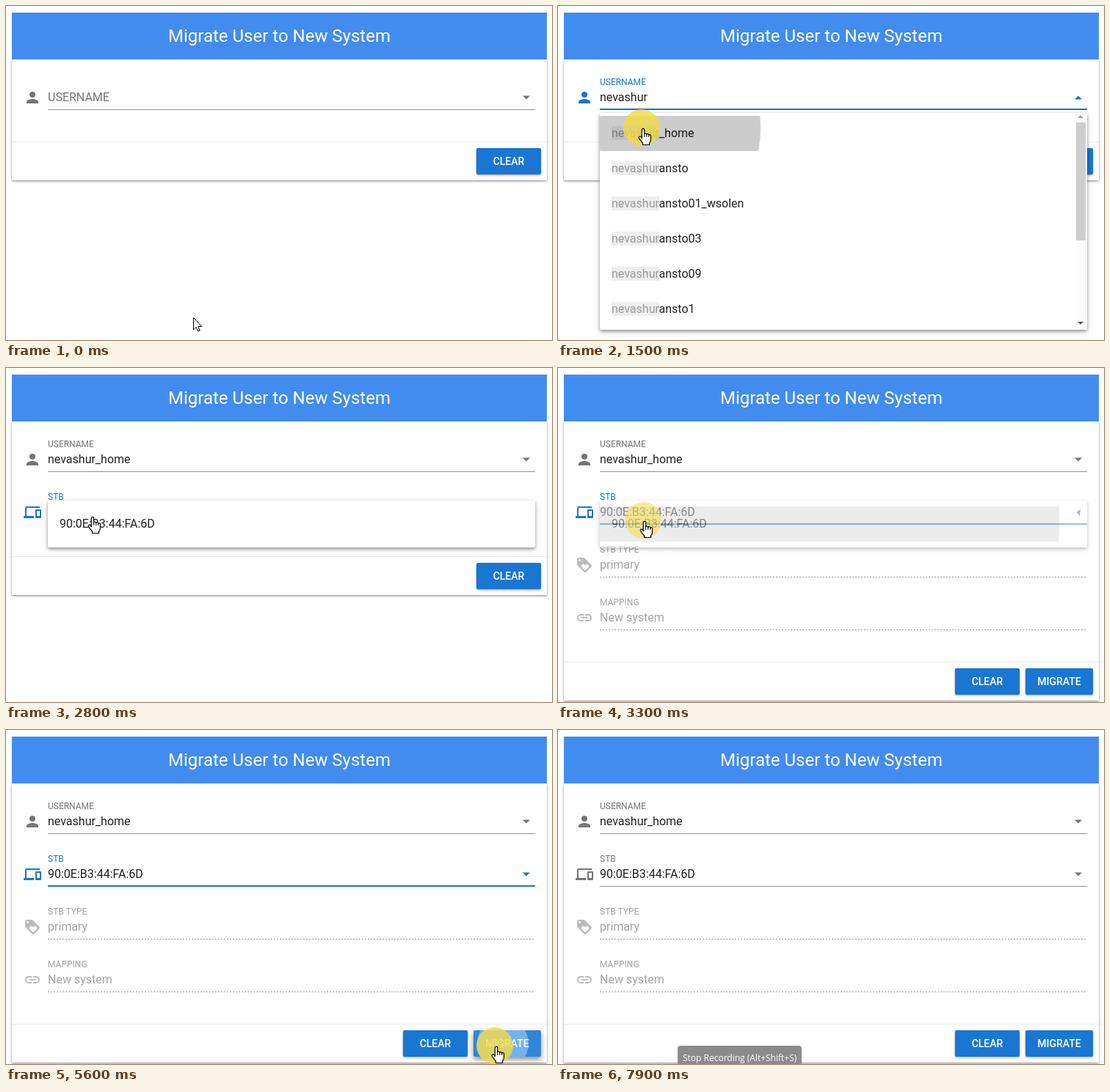
Write an HTML page that moves like this. It is 744 px wide and 456 px high and loops after 8100 ms.

```html
<!DOCTYPE html>
<html lang="en">
<head>
<meta charset="utf-8">
<title>Migrate User to New System</title>
<style>
  html, body { margin: 0; width: 100%; height: 100%; overflow: hidden; background: #fff; }
  svg { display: block; width: 744px; height: 456px; font: 16px Roboto, sans-serif; }
  .card { fill: #fff; filter: drop-shadow(0 1px 1px rgba(0,0,0,.38)) drop-shadow(0 1px 2px rgba(0,0,0,.16)); }
  .btn { filter: drop-shadow(0 1px 1px rgba(0,0,0,.28)) drop-shadow(0 1px 2px rgba(0,0,0,.14)); }
  .btn.down { filter: drop-shadow(0 4px 3px rgba(0,0,0,.3)) drop-shadow(0 2px 4px rgba(0,0,0,.18)); }
  .btn-text { font-size: 14px; font-weight: 500; fill: #fff; text-anchor: middle; }
  .menu { fill: #fff; filter: drop-shadow(0 2px 2px rgba(0,0,0,.36)) drop-shadow(0 3px 5px rgba(0,0,0,.13)); }
  .title { font-size: 24px; fill: #fff; text-anchor: middle; }
  .tip { font: 12px "Open Sans", sans-serif; fill: #fff; }
</style>
</head>
<body>
<svg id="stage" viewBox="0 0 744 456"></svg>
<script>
const LOOP = 8100, STEP = 100;
const BLUE = '#1976d2', HOVER = '#3385d9', INK = '#212121', GREY = '#757575', FAINT = '#a3a3a3';
const QUERY = 'nevashur', USER = 'nevashur_home', MAC = '90:0E:B3:44:FA:6D';
const NAMES = ['_home', 'ansto', 'ansto01_wsolen', 'ansto03', 'ansto09', 'ansto1'];

const ICONS = {
  person: 'M12 12a4 4 0 1 0 0-8 4 4 0 0 0 0 8zm0 2c-2.67 0-8 1.34-8 4v2h16v-2c0-2.66-5.33-4-8-4z',
  devices: 'M4 6h18V4H4a2 2 0 0 0-2 2v11H0v3h14v-3H4zM23 8h-6a1 1 0 0 0-1 1v10a1 1 0 0 0 1 1h6a1 1 0 0 0 1-1V9a1 1 0 0 0-1-1zm-1 9h-4v-7h4z',
  tag: 'M4 2h7l1.4.6 9 9a2 2 0 0 1 0 2.8l-7 7a2 2 0 0 1-2.8 0l-9-9L2 11V4a2 2 0 0 1 2-2z' +
    'M5.5 4a1.5 1.5 0 1 0 0 3 1.5 1.5 0 0 0 0-3zM13 19.5l4.3-4.2a2.5 2.5 0 0 0-3.6-3.6l-.7.7-.7-.7a2.5 2.5 0 0 0-3.6 3.6z',
  link: 'M3.9 12A3.1 3.1 0 0 1 7 8.9h4V7H7a5 5 0 0 0 0 10h4v-1.9H7A3.1 3.1 0 0 1 3.9 12zM8 13h8v-2H8zm9-6h-4v1.9h4a3.1 3.1 0 0 1 0 6.2h-4V17h4a5 5 0 0 0 0-10z'
};

const CURSORS = {
  arrow: '<path d="M.5.5V17l3.7-3.6 2.5 5.7 2.5-1-2.5-5.6h5.1z" fill="#fff" stroke="#000"/>',
  beam: '<path d="M-3-8h2.5l.5.5.5-.5H3M0-7.500V7.500M-3 8h2.500l.5-.5.5.5H3" fill="none" stroke="#000"/>',
  hand: '<path d="M-1.700 14V2a1.700 1.700 0 0 1 3.400 0v6a1.600 1.600 0 0 1 3.100.5 1.600 1.600 0 0 1 3 .8 1.500 1.500 0 0 1 2.700 1.200V15q0 3-2 5v2.500H-.5V20q-3-3-5.200-7a1.600 1.600 0 0 1 2.600-1.700z" fill="#fff" stroke="#000" stroke-width="1.200"/>' +
    '<path d="M1.700 8v4M4.800 8.500V12M7.800 9.500V12" stroke="#000" fill="none"/>'
};

// time, x, y of the pointer tip
const PATH = [
  [0, 255, 425], [100, 255, 430], [400, 241, 403], [500, 241, 403], [600, 119, 124],
  [1200, 119, 124], [1500, 116, 167], [2000, 116, 167], [2400, 118, 195], [2600, 118, 196],
  [3000, 118, 209], [4100, 118, 209], [5000, 660, 425], [5200, 668, 432], [6300, 668, 432], [6700, 650, 480]
];
// start and end of each click highlight
const CLICKS = [[1100, 1300], [1500, 1700], [2500, 2700], [3200, 3400], [5500, 5800]];

const ramp = (t, a, b) => Math.min(1, Math.max(0, (t - a) / (b - a)));
const within = (t, a, b) => t >= a && t < b;
const lerp = (a, b, k) => a + (b - a) * k;

const rect = (x, y, w, h, fill, more = '') =>
  `<rect x="${x}" y="${y}" width="${w}" height="${h}" fill="${fill}" ${more}/>`;
const text = (x, y, s, fill, more = '') => `<text x="${x}" y="${y}" fill="${fill}" ${more}>${s}</text>`;
const circle = (x, y, r, fill, more = '') => `<circle cx="${x}" cy="${y}" r="${r}" fill="${fill}" ${more}/>`;
const clip = (id, x, y, w, h, body) =>
  `<clipPath id="${id}">${rect(x, y, w, h, '#000', 'rx="2"')}</clipPath><g clip-path="url(#${id})">${body}</g>`;

function field(row, f) {
  const y = 72 * row, k = f.float ?? 1;
  const main = f.focus ? BLUE : f.disabled ? FAINT : GREY;
  let s = `<path transform="translate(24 ${113 + y})" d="${ICONS[f.icon]}" fill="${f.disabled ? '#b9bcbb' : main}" fill-rule="evenodd"/>`;
  s += text(57, lerp(130, 108, k) + y, f.label, main, `font-size="${lerp(16, 12, k)}"`);
  s += text(57, 130 + y, f.value || '', f.disabled ? FAINT : INK);
  if (f.disabled) {
    return s + `<path d="M57 ${141.5 + y}H721" stroke="#9c9c9c" stroke-dasharray="2 2"/>`;
  }
  s += f.focus ? rect(57, 140 + y, 664, 2, BLUE) : rect(57, 141 + y, 664, 1, f.hover ? '#222' : '#949494');
  return s + `<path transform="translate(709 ${125 + y}) rotate(${180 * f.open})" d="M-5-2.500H5L0 2.500z" fill="${main}"/>`;
}

function button(x, y, w, label, fill, down, extra = '') {
  return rect(x, y, w, 36, fill, `rx="2" class="btn ${down ? 'down' : ''}"`) + extra +
    text(x + w / 2, y + 23, label, '#fff', 'class="btn-text"');
}

function itemRipple(id, t, start, x, y, rowY) {
  if (t < start) return '';
  const r = 160 + 4.05 * (t - start), shade = t > start ? 0.13 : 0.2;
  return clip(id, 57, rowY, 664, 48, circle(x, y, r, '#000', `opacity="${shade}"`));
}

function nameMenu(t, open, typed) {
  if (!open) return '';
  let s = rect(57, 146, 664, 296, '#fff', 'rx="2" class="menu"');
  NAMES.forEach((tail, i) => {
    const y = 179 + 48 * i;
    if (typed.length) s += rect(73, y - 15, 65 * typed.length / QUERY.length, 19, '#eee');
    s += text(73, y, `<tspan fill="#9a9a9a">${typed}</tspan>${QUERY.slice(typed.length)}${tail}`, INK);
  });
  s += itemRipple('row1', t, 1500, 116, 167, 150);
  s += rect(705, 146, 15, 296, '#fbfbfb') + rect(706, 159, 13, 161, '#cdcdcd');
  s += '<path d="M708 153h8l-4-4z" fill="#a3a3a3"/><path d="M708 431h8l-4 4z" fill="#505050"/>';
  return `<g opacity="${open}">${s}</g>`;
}

function stbMenu(t, open) {
  if (!open) return '';
  return `<g opacity="${open}">${rect(57, 181, 664, 64, '#fff', 'rx="2" class="menu"')}` +
    text(73, 218, MAC, INK) + itemRipple('row2', t, 3200, 118, 209, 189) + '</g>';
}

function migrateButton(t, y) {
  const fill = t === 7800 ? '#2a80d6' : within(t, 4900, 7800) ? HOVER : BLUE;
  let wave = '';
  if (within(t, 5500, 6000)) {
    const k = (t - 5500) / 100, fade = 1 - ramp(t, 5600, 6000);
    wave = clip('wave', 637, y, 92, 36, circle(Math.min(683, 670 + 7 * k), 431 - 3 * Math.min(k, 1), 12 + 23 * k, '#9cd0ff', `opacity="${0.6 * fade}"`));
  }
  return button(637, y, 92, 'MIGRATE', fill, within(t, 5500, 5900), wave);
}

function pointer(t) {
  if (t >= 6700) return '';
  const i = Math.max(1, PATH.findIndex(p => p[0] >= t));
  const [a, b] = [PATH[i - 1], PATH[i]], k = ramp(t, a[0], b[0]);
  const x = Math.round(lerp(a[1], b[1], k)), y = Math.round(lerp(a[2], b[2], k));
  const hand = within(t, 1300, 1700) || within(t, 2200, 4300) || within(t, 4900, 6400);
  const kind = hand ? 'hand' : within(t, 600, 1300) ? 'beam' : 'arrow';
  const hit = CLICKS.find(c => within(t, c[0], c[1]));
  const glow = hit ? circle(x - 2, y - 1, 25, '#f3db45', `opacity="${0.8 * Math.min(1, (hit[1] - t) / 150)}"`) : '';
  return glow + `<g transform="translate(${x} ${y})">${CURSORS[kind]}</g>`;
}

function scene(t) {
  const picked = t >= 1600, chosen = t >= 3300;
  const bottom = chosen ? 454 : picked ? 310 : 238;
  const open1 = ramp(t, 1100, 1400) * (1 - ramp(t, 1500, 1720));
  const open2 = ramp(t, 2500, 2800) * (1 - ramp(t, 3200, 3420));
  const typed = QUERY.slice(0, Math.round(8 * ramp(t, 1100, 1300)));

  let s = rect(8, 73, 729, bottom - 73, '#fff', 'class="card" rx="1"');
  s += rect(8, 9, 729, 64, '#428cef') + text(372.5, 49, 'Migrate User to New System', '#fff', 'class="title"');
  s += rect(8, bottom - 53, 729, 1, '#ececec');

  s += field(0, {
    icon: 'person', label: 'USERNAME', value: picked ? USER : typed,
    float: ramp(t, 1000, 1200), focus: within(t, 1100, 2500), open: open1
  });
  if (picked) {
    s += field(1, {
      icon: 'devices', label: 'STB', value: chosen ? MAC : '',
      float: ramp(t, 2400, 2700), focus: within(t, 2500, 5700), hover: within(t, 2300, 2500), open: open2
    });
  }
  if (chosen) {
    s += field(2, { icon: 'tag', label: 'STB TYPE', value: 'primary', disabled: true });
    s += field(3, { icon: 'link', label: 'MAPPING', value: 'New system', disabled: true });
    s += migrateButton(t, bottom - 44);
  }
  s += button(chosen ? 541 : 641, bottom - 44, 88, 'CLEAR', BLUE);
  s += nameMenu(t, open1, typed) + stbMenu(t, open2);

  if (t >= 7800) {
    s += `<g opacity="${t >= 7900 ? 1 : 0.6}">${rect(163, 431, 169, 30, '#8b8b8b', 'rx="4"')}` +
      text(170, 452, 'Stop Recording (Alt+Shift+S)', '#fff', 'class="tip"') + '</g>';
  }
  return s + pointer(t);
}

const stage = document.getElementById('stage');
const start = performance.now();
let shown = -1;

function tick() {
  const t = Math.floor(((performance.now() - start) % LOOP) / STEP) * STEP;
  if (t !== shown) {
    stage.innerHTML = scene(t);
    shown = t;
  }
  requestAnimationFrame(tick);
}
tick();
</script>
</body>
</html>
```
